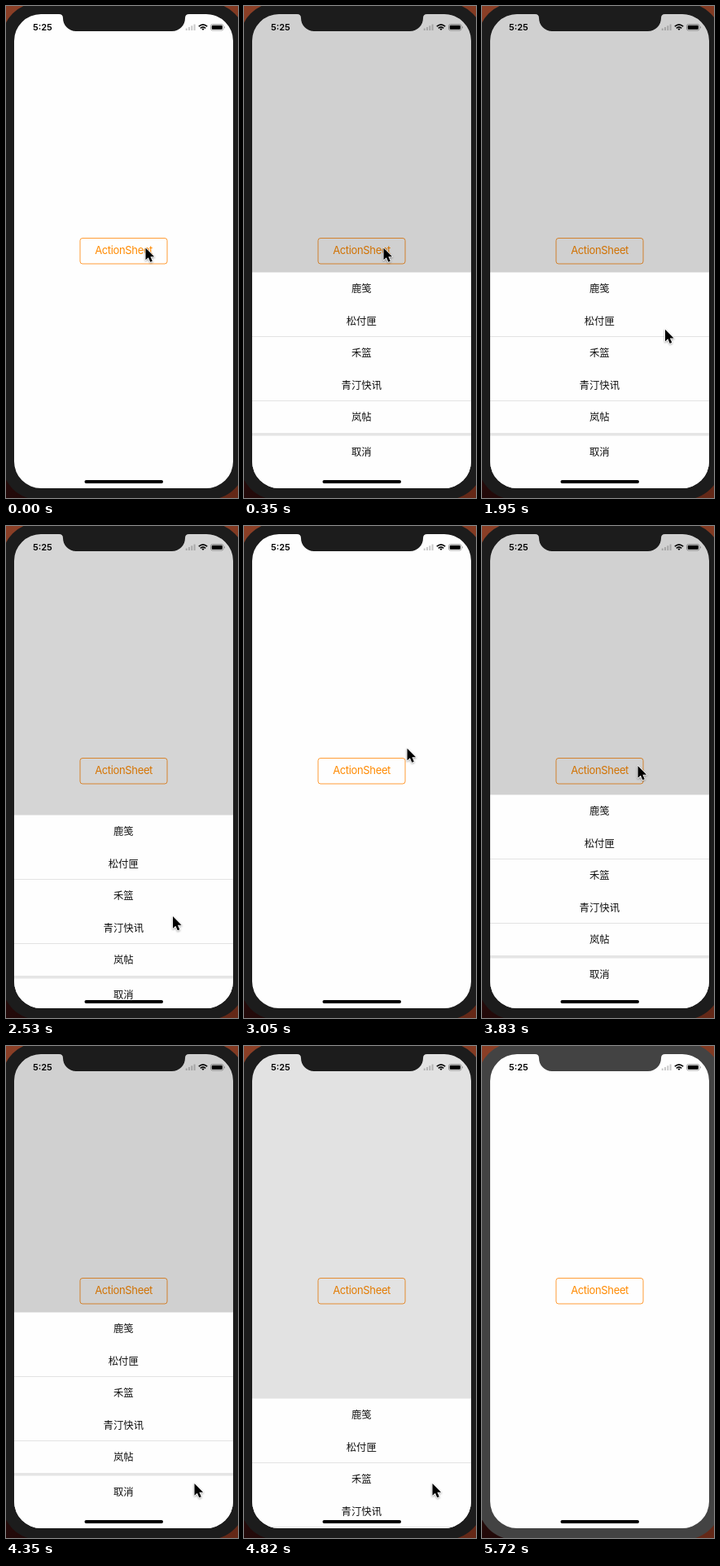
Write an HTML page that moves like this. It is 285 px wide and 605 px high and loops after 5.82 s.

```html
<!DOCTYPE html>
<html lang="zh-CN">
<head>
<meta charset="utf-8">
<title>ActionSheet</title>
<style>
  html, body { margin: 0; width: 100%; height: 100%; overflow: hidden; background: #1c1c1c; }
  svg { display: block; width: 285px; height: 605px; }
  .latin { font-family: Inter, sans-serif; }
  #sheet text { font: 12.4px "Noto Sans CJK SC", "Noto Sans CJK", sans-serif; fill: #111; text-anchor: middle; }
</style>
</head>
<body>
<svg viewBox="0 0 285 605">
  <defs>
    <linearGradient id="left" x1="0" y1="0" x2="0" y2="1">
      <stop offset="0" stop-color="#8b3f26"/><stop offset="1" stop-color="#220909"/>
    </linearGradient>
    <linearGradient id="right" x1="0" y1="0" x2="0" y2="1">
      <stop offset="0" stop-color="#833a22"/><stop offset="1" stop-color="#642817"/>
    </linearGradient>
    <clipPath id="screen">
      <path d="M43 10H65Q70 10 70 15A16 16 0 0 0 86 31H204A16 16 0 0 0 220 15Q220 10 225 10H246A33 33 0 0 1 279 43V560A33 33 0 0 1 246 593H43A33 33 0 0 1 10 560V43A33 33 0 0 1 43 10Z"/>
    </clipPath>
  </defs>

  <rect width="143" height="605" fill="url(#left)"/>
  <rect x="143" width="142" height="605" fill="url(#right)"/>
  <rect id="bezel" x="-5" y="-4" width="299" height="611" rx="45" fill="#1c1c1c"/>

  <g clip-path="url(#screen)">
    <rect x="10" y="10" width="269" height="583" fill="#fefefe"/>

    <text class="latin" x="33" y="30" font-size="11" font-weight="600" textLength="" fill="#000">5:25</text>
    <path d="M221.7 30V27.5M225 30V26M228.300 30V24.300M231.600 30V22.500" stroke="#c9c9c9" stroke-width="2"/>
    <g fill="none" stroke="#000" stroke-width="1.600">
      <path d="M236.800 25.200Q242 20.600 247.200 25.200M238.800 27.300Q242 24.500 245.200 27.300"/>
      <path d="M240.300 28L242 29.900L243.700 28Q242 26.900 240.300 28Z" fill="#000" stroke="none"/>
    </g>
    <rect x="251.500" y="22.500" width="15.500" height="7.500" rx="2" fill="none" stroke="#a9a9a9"/>
    <rect x="252.700" y="23.700" width="13.100" height="5.100" rx="1"/>
    <path d="M268 25V27.600Q269 27.300 269 26.300T268 25Z" fill="#a9a9a9"/>

    <rect x="91" y="285.500" width="107" height="31.500" rx="3" fill="none" stroke="#ff8c14" stroke-opacity=".85"/>
    <text class="latin" x="144.600" y="305.300" font-size="13" letter-spacing="-.35" text-anchor="middle" fill="#ff8a00">ActionSheet</text>

    <rect id="dim" x="10" y="10" width="269" height="583" opacity="0"/>
    <g id="sheet">
      <rect x="10" y="327.500" width="269" height="270" fill="#fefefe"/>
      <path d="M10 406.500H279M10 485.500H279" stroke="#e3e3e3"/>
      <rect x="10" y="525" width="269" height="3.500" fill="#e5e5e5"/>
    </g>
    <rect x="96.500" y="583" width="96.500" height="4" rx="2"/>
  </g>

  <path id="cursor" d="M0 0V14.800L3.400 11.700L5.800 17.300L8.300 16.200L5.900 10.800H10.600Z"
        stroke="#fff" stroke-width="1.600" paint-order="stroke" stroke-linejoin="round"
        style="filter: drop-shadow(0 1px 1px rgba(0,0,0,.35))"/>
</svg>
<script>
const LOOP = 5820, STEP = 57.5, TRAVEL = 266;
const $ = id => document.getElementById(id);

['鹿笺', '松付匣', '禾篮', '青汀快讯', '岚帖', '取消'].forEach((label, i) => {
  const text = document.createElementNS('http://www.w3.org/2000/svg', 'text');
  text.setAttribute('x', 144.3);
  text.setAttribute('y', i < 5 ? 352 + i * 39.5 : 553);
  text.textContent = label;
  $('sheet').append(text);
});

// The picture advances in steps, restarted at each burst of movement.
const bursts = [0, 120, 1180, 1770, 2470, 3590, 4640];
function quantize(t) {
  const start = bursts.filter(b => b <= t).pop();
  return start + Math.floor((t - start) / STEP) * STEP;
}

// Ease-in-out, cubic-bezier(.42, 0, .58, 1)
function ease(x) {
  if (x <= 0) return 0;
  if (x >= 1) return 1;
  let lo = 0, hi = 1;
  for (let i = 0; i < 24; i++) {
    const s = (lo + hi) / 2, r = 1 - s;
    if (3 * r * r * s * .42 + 3 * r * s * s * .58 + s * s * s < x) lo = s; else hi = s;
  }
  return lo * lo * (3 - 2 * lo);
}

const ramp = (t, start, length) => ease((t - start) / length);
const openness = t =>
  ramp(t, 70, 280) - ramp(t, 2460, 300) + ramp(t, 3562, 280) - ramp(t, 4680, 300);

// Pointer stops: time, x, y
const path = [
  [0, 171.5, 297.5], [1140, 171.5, 297.5], [1410, 246.5, 293], [1735, 246.5, 293],
  [1942, 225, 397.5], [2345, 205, 480], [2600, 205, 480], [3045, 200.5, 273.5],
  [3275, 185.5, 296], [3762, 185.5, 296], [3820, 191.5, 295], [4165, 234, 536.5],
  [4337, 231.5, 538], [4813, 231.5, 538], [5157, 243.5, 592.5], [5330, 243.5, 608],
  [LOOP, 243.5, 608]
];

const slope = (i, axis) =>
  path[i] && path[i + 1] ? (path[i + 1][axis] - path[i][axis]) / (path[i + 1][0] - path[i][0]) : 0;

function tangent(i, axis) {
  const a = slope(i - 1, axis), b = slope(i, axis);
  return a * b > 0 ? 2 * a * b / (a + b) : 0;
}

function pointer(t, axis) {
  let i = 0;
  while (i < path.length - 2 && t >= path[i + 1][0]) i++;
  const [p, q] = [path[i], path[i + 1]], span = q[0] - p[0], u = (t - p[0]) / span, v = 1 - u;
  return p[axis] * v * v * (1 + 2 * u) + q[axis] * u * u * (1 + 2 * v)
    + span * u * v * (tangent(i, axis) * v - tangent(i + 1, axis) * u);
}

function draw(now) {
  const time = now % LOOP, t = quantize(time), open = openness(t);
  const blurred = time >= 5720;
  $('sheet').setAttribute('transform', `translate(0 ${Math.round((1 - open) * TRAVEL)})`);
  $('sheet').style.visibility = open > 0.001 ? 'visible' : 'hidden';
  $('dim').setAttribute('opacity', open * .18);
  $('cursor').setAttribute('transform', `translate(${pointer(t, 1)} ${pointer(t, 2)})`);
  $('cursor').style.visibility = time >= 5340 ? 'hidden' : 'visible';
  $('bezel').setAttribute('fill', blurred ? '#434343' : '#1c1c1c');
}

const begin = performance.now();
function tick() {
  draw(performance.now() - begin);
  requestAnimationFrame(tick);
}
tick();
</script>
</body>
</html>
```
